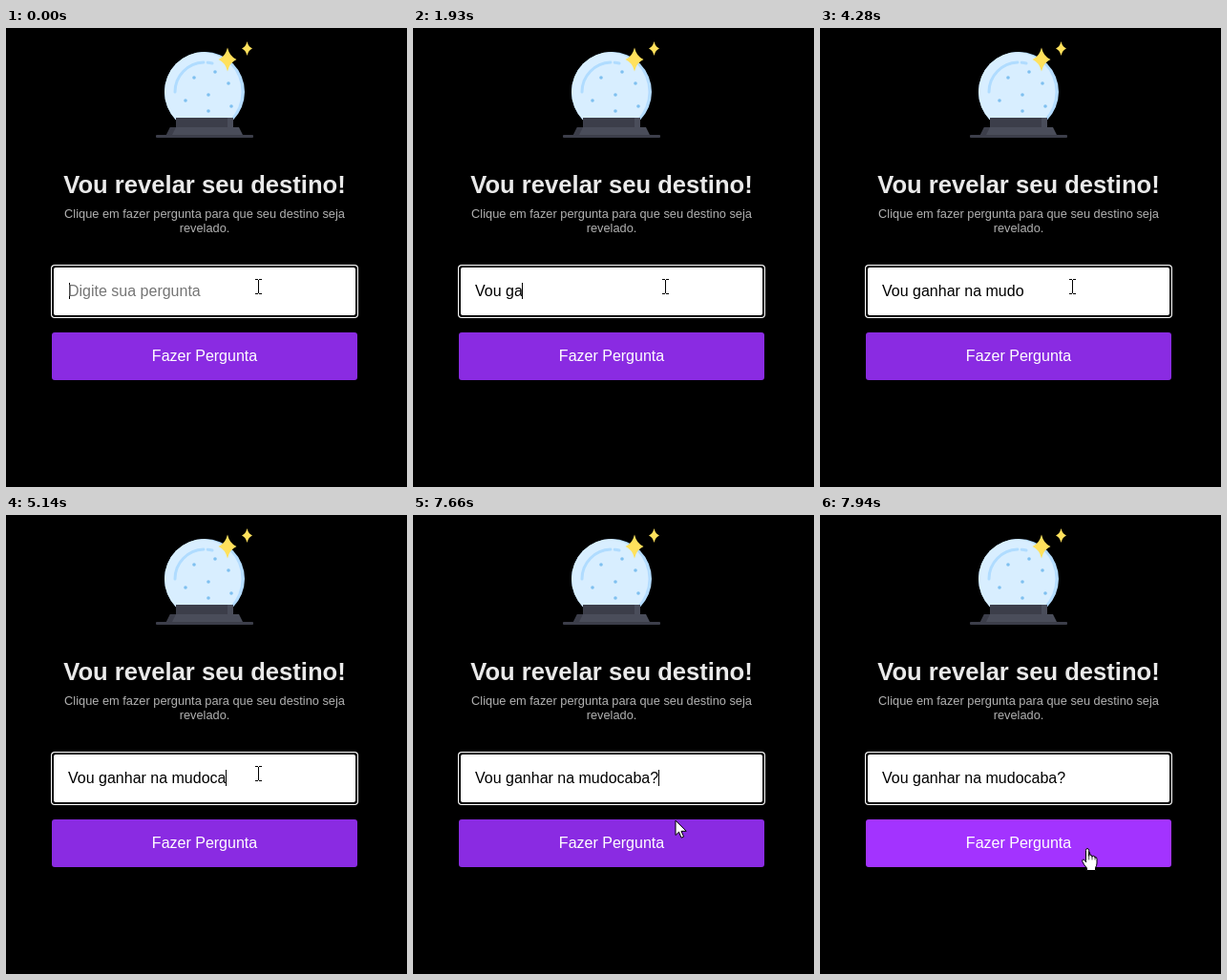
An HTML page with a canvas that plays this animation: 420x481 px, repeating every 8 s.

```html
<!DOCTYPE html>
<html lang="pt">
<head>
<meta charset="utf-8">
<title>Vou revelar seu destino!</title>
<style>
  html, body { margin: 0; width: 100%; height: 100%; overflow: hidden; background: #000; }
  body { position: relative; font: 16px/18px "Liberation Sans", Arial, sans-serif; }
  canvas { position: absolute; left: 0; top: 0; display: block; }
  .text { position: absolute; left: 48px; width: 320px; text-align: center; white-space: pre; }
  #title { top: 149px; font-size: 25.6px; line-height: 30px; font-weight: bold; color: #eaeaea; }
  #hint { top: 187px; font-size: 12.8px; line-height: 15px; color: #b2b2b2; }
  #field { top: 267px; left: 65px; width: 286px; text-align: left; }
  #ask { top: 335px; color: #fff; }
</style>
</head>
<body>
<canvas id="stage" width="420" height="481"></canvas>
<div class="text" id="title">Vou revelar seu destino!</div>
<div class="text" id="hint">Clique em fazer pergunta para que seu destino seja
revelado.</div>
<div class="text" id="field"></div>
<div class="text" id="ask">Fazer Pergunta</div>
<script>
const LOOP = 8000;
const BLINK = 530;
const HOVER_START = 7720;
const HOVER_TIME = 200;
const PLACEHOLDER = "Digite sua pergunta";

// "<" is a backspace; each key has its own press time.
const KEYS = "Vou ganhar na mudod<caba?";
const KEY_TIMES = [
  130, 410, 540, 870, 1730, 1930, 2000, 2130, 2260, 2390, 2520, 2650,
  2780, 2910, 3040, 3260, 3590, 3750, 4350, 4810, 4950, 5140, 5210, 5340, 6330
];

const POINTER = [
  [0, drawBeam, 264, 271], [7060, drawBeam, 264, 267], [7130, drawBeam, 264, 269],
  [7390, drawBeam, 264, 274], [7460, drawBeam, 265, 282], [7520, drawBeam, 268, 293],
  [7590, drawArrow, 272, 309], [7660, drawArrow, 275, 320], [7720, drawHand, 277, 329],
  [7790, drawHand, 279, 339], [7860, drawHand, 280, 346], [7940, drawHand, 281, 350]
];

const ctx = document.getElementById("stage").getContext("2d");
const field = document.getElementById("field");

function polygon(color, points) {
  ctx.fillStyle = color;
  ctx.beginPath();
  points.forEach(([x, y]) => ctx.lineTo(x, y));
  ctx.closePath();
  ctx.fill();
}

function disc(color, x, y, r) {
  ctx.fillStyle = color;
  ctx.beginPath();
  ctx.arc(x, y, r, 0, Math.PI * 2);
  ctx.fill();
}

function box(color, x, y, w, h, r = 0) {
  ctx.fillStyle = color;
  ctx.beginPath();
  ctx.roundRect(x, y, w, h, r);
  ctx.fill();
}

function arc(x, y, r, from, to) {
  ctx.beginPath();
  ctx.arc(x, y, r, from * Math.PI / 180, to * Math.PI / 180);
  ctx.stroke();
}

function star(x, y, w, h) {
  const k = 0.24;
  ctx.fillStyle = "#ffe15c";
  ctx.beginPath();
  ctx.moveTo(x, y - h);
  ctx.quadraticCurveTo(x + w * k, y - h * k, x + w, y);
  ctx.quadraticCurveTo(x + w * k, y + h * k, x, y + h);
  ctx.quadraticCurveTo(x - w * k, y + h * k, x - w, y);
  ctx.quadraticCurveTo(x - w * k, y - h * k, x, y - h);
  ctx.fill();
}

function drawBall() {
  disc("#b4dcff", 208, 67, 42);
  ctx.save();
  ctx.beginPath();
  ctx.arc(208, 67, 42, 0, Math.PI * 2);
  ctx.clip();
  disc("#d8eeff", 204.5, 67, 42);
  ctx.restore();

  ctx.strokeStyle = "#b0dcff";
  ctx.lineWidth = 3;
  ctx.lineCap = "round";
  arc(208, 67, 31, 180, 268);
  arc(208, 67, 31, 276, 285);

  const specks = [[197, 52], [219, 46], [233, 58], [212, 70], [188, 76], [212, 87], [236, 82]];
  specks.forEach(([x, y]) => disc("#7fc0f0", x, y, 1.8));

  box("#3c3e4a", 178, 94, 60, 11);
  box("#4a4d5a", 232, 94, 6, 11);
  polygon("#4a4d5a", [[172, 104], [244, 104], [248, 112], [168, 112]]);
  polygon("#3c3e4a", [[172, 104], [178, 104], [174, 112], [168, 112]]);
  box("#3c3e4a", 157, 112, 102, 3, 1);

  star(232, 33, 9.5, 12.5);
  star(252.5, 21.5, 5.5, 7.5);
}

function drawInput() {
  box("#fff", 47, 248, 322, 56, 4);
  box("#000", 48, 249, 320, 54, 3.5);
  box("#fff", 50, 251, 316, 50, 2);
}

function drawButton(time) {
  const p = Math.min(1, Math.max(0, (time - HOVER_START) / HOVER_TIME));
  const mix = (a, b) => Math.round(a + (b - a) * p);
  box(`rgb(${mix(138, 163)},${mix(43, 51)},${mix(226, 255)})`, 48, 319, 320, 50, 3);
}

function drawBeam(x, y) {
  box("#000", x, y - 7, 1, 14);
  for (const edge of [y - 8, y + 7]) {
    box("#000", x - 3, edge, 3, 1);
    box("#000", x + 1, edge, 3, 1);
  }
}

function outlined(path, x, y) {
  ctx.save();
  ctx.translate(x, y);
  ctx.lineWidth = 1;
  ctx.lineJoin = "round";
  ctx.fillStyle = "#fff";
  ctx.strokeStyle = "#000";
  ctx.fill(path);
  ctx.stroke(path);
  ctx.restore();
}

function drawArrow(x, y) {
  outlined(new Path2D("M0 .5V15.5L3.5 12.2 6 18.2 8.5 17.2 6 11.3H10.8Z"), x, y);
}

function drawHand(x, y) {
  outlined(new Path2D(
    "M-2.5 12V1.5Q-2.5-.5-1-.5T.7 1.5V7.5Q1-.0 2 6.3Q4 6 4 8.3Q4.5 6.8 5.8 7.3" +
    "T7 9Q9 8 9 10.5V15Q9 17.5 7.5 19.5V22.5H-1.5V20Q-4.5 17-6 13.5" +
    "Q-6.8 11.5-5.5 11T-2.5 13.5Z"), x, y);
  ctx.strokeStyle = "#000";
  ctx.lineWidth = 0.7;
  ctx.beginPath();
  for (const dx of [0.7, 4, 7]) {
    ctx.moveTo(x + dx, y + 8);
    ctx.lineTo(x + dx, y + 11);
  }
  ctx.stroke();
}

function typedText(count) {
  let text = "";
  for (const key of KEYS.slice(0, count)) {
    text = key === "<" ? text.slice(0, -1) : text + key;
  }
  return text;
}

function drawField(time) {
  const count = KEY_TIMES.filter(t => t <= time).length;
  const text = typedText(count);
  const shown = text || PLACEHOLDER;
  if (field.textContent !== shown) {
    field.textContent = shown;
    field.style.color = text ? "#000" : "#757575";
  }
  const lastKey = count ? KEY_TIMES[count - 1] : 0;
  if (Math.floor((time - lastKey) / BLINK) % 2 === 0) {
    ctx.font = '16px "Liberation Sans", Arial, sans-serif';
    const x = text ? Math.floor(65 + ctx.measureText(text).width) : 66;
    box("#000", x, 267, 1, 17);
  }
}

function draw(time) {
  box("#000", 0, 0, 420, 481);
  drawBall();
  drawInput();
  drawButton(time);
  drawField(time);
  const [, shape, x, y] = POINTER.filter(step => step[0] <= time).pop();
  shape(x, y);
}

const start = performance.now();
function tick() {
  draw((performance.now() - start) % LOOP);
  requestAnimationFrame(tick);
}
tick();
</script>
</body>
</html>
```
